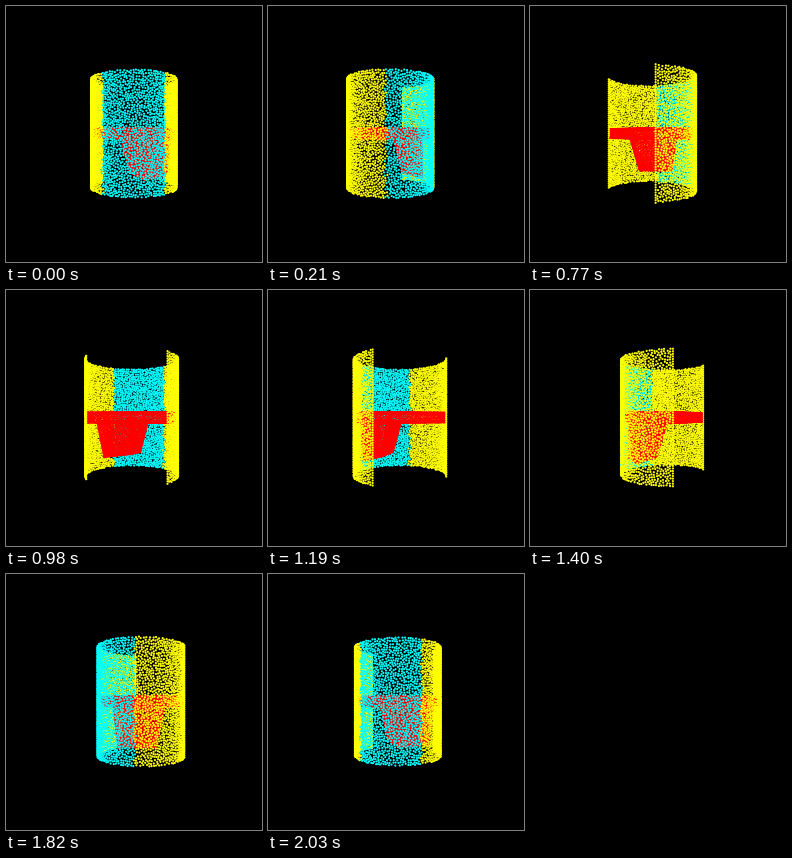
Write a matplotlib script that moves like this. It is 256 by 256 pixels and loops after 2100 ms.

```python
import math
import random

import numpy as np
import matplotlib.pyplot as plt
from matplotlib.animation import FuncAnimation

SIZE, DPI = 256, 64
FRAMES, INTERVAL = 30, 70
CX, CY, CAMERA = 127.8, 127.5, 240
DOT, GAP = 2.2, 1.75

RADIUS, AXIS = 43.8, -9.5       # shell radius and its offset from the pivot
HALF_HEIGHT = 54.9
HALF_ARC, CYAN_ARC = math.radians(125), math.radians(40)
PLATE, PLATE_MID, PLATE_BACK, THICK = 41, -12, -33.5, 4.4

YELLOW, CYAN, RED = (1, 1, 0), (0, 1, 1), (1, 0, 0)

random.seed(4)


def scatter_rect(w, h):
    """Evenly spaced random points over a w by h rectangle, as two arrays."""
    cells, points = {}, []

    def add(x, y):
        i, j = int(x // GAP), int(y // GAP)
        for a in (i - 1, i, i + 1):
            for b in (j - 1, j, j + 1):
                for px, py in cells.get((a, b), ()):
                    if (px - x) ** 2 + (py - y) ** 2 < GAP * GAP:
                        return
        cells.setdefault((i, j), []).append((x, y))
        points.append((x, y))

    # the upright sides are crisp
    for y in np.linspace(0, h, int(h / GAP / 1.15) + 1):
        add(0, y)
        add(w, y)
    for _ in range(int(14 * w * h / GAP ** 2)):
        add(random.uniform(0, w), random.uniform(0, h))
    return np.array(points).T


def shell():
    s, y = scatter_rect(2 * HALF_ARC * RADIUS, 2 * HALF_HEIGHT)
    phi = s / RADIUS - HALF_ARC
    xyz = np.array([RADIUS * np.sin(phi), y - HALF_HEIGHT,
                    AXIS + RADIUS * np.cos(phi)])
    ragged = np.array([random.uniform(-0.04, 0.04) for _ in phi])
    cyan = np.abs(phi) < CYAN_ARC + ragged
    return xyz, np.where(cyan[:, None], CYAN, YELLOW)


def quad(a, b, c, d):
    """Points on the patch with corners a, b (first edge) and d, c (opposite)."""
    a, b, c, d = (np.array(p, float)[:, None] for p in (a, b, c, d))
    w = (np.linalg.norm(b - a) + np.linalg.norm(c - d)) / 2
    h = (np.linalg.norm(d - a) + np.linalg.norm(c - b)) / 2
    s, t = scatter_rect(w, h)
    s, t = s / w, t / h
    return (a * (1 - s) + b * s) * (1 - t) + (d * (1 - s) + c * s) * t


def plate():
    """Flat disc cut straight at the back."""
    parts = []
    for y in (-THICK, THICK):
        x, z = scatter_rect(2 * PLATE, PLATE_MID + PLATE - PLATE_BACK)
        x, z = x - PLATE, z + PLATE_BACK
        keep = np.hypot(x, z - PLATE_MID) < PLATE
        parts.append(np.array([x, np.full_like(x, y), z])[:, keep])

    half = math.acos((PLATE_BACK - PLATE_MID) / PLATE)
    s, y = scatter_rect(2 * half * PLATE, 2 * THICK)
    phi = s / PLATE - half
    parts.append(np.array([PLATE * np.sin(phi), y - THICK,
                           PLATE_MID + PLATE * np.cos(phi)]))

    x, z = PLATE * math.sin(half), PLATE_BACK
    parts.append(quad((-x, -THICK, z), (x, -THICK, z),
                      (x, THICK, z), (-x, THICK, z)))
    return parts


def block():
    """Tapered box hanging under the plate, turned and with a sloping base."""
    c, s = math.cos(math.radians(132)), math.sin(math.radians(132))

    def corner(p, y, q):
        return p * c - q * s, y, p * s + q * c

    top = [corner(p, THICK, q) for p, q in
           [(-27.5, 0), (18, 0), (18, -25), (-27.5, -25)]]
    base = [corner(p, y, q) for p, y, q in
            [(-19, 36.5, -8), (14, 36.5, -8), (14, 41, -26), (-19, 41, -26)]]
    sides = [quad(top[i], top[(i + 1) % 4], base[(i + 1) % 4], base[i])
             for i in range(4)]
    return sides + [quad(*base)]


shell_xyz, shell_rgb = shell()
red_xyz = np.hstack(plate() + block())
cloud = np.hstack([shell_xyz, red_xyz])
colors = np.vstack([shell_rgb, np.tile(RED, (red_xyz.shape[1], 1))])

fig = plt.figure(figsize=(SIZE / DPI, SIZE / DPI), dpi=DPI, facecolor="black")
ax = fig.add_axes([0, 0, 1, 1])
ax.set_xlim(0, SIZE)
ax.set_ylim(SIZE, 0)
ax.axis("off")
dots = ax.scatter(cloud[0], cloud[1], s=(DOT * 72 / DPI) ** 2, c=colors,
                  marker="o", linewidths=0)


def draw(i):
    turn = 2 * math.pi * i / FRAMES
    x, y, z = cloud
    sx = x * math.cos(turn) + z * math.sin(turn)
    depth = z * math.cos(turn) - x * math.sin(turn)
    scale = CAMERA / (CAMERA - depth)
    spots = np.column_stack([CX + sx * scale, CY + y * scale])
    order = np.argsort(depth)
    dots.set_offsets(spots[order])
    dots.set_facecolors(colors[order])
    return (dots,)


anim = FuncAnimation(fig, draw, frames=FRAMES, interval=INTERVAL,
                     repeat=True, repeat_delay=0)
plt.show()
```
